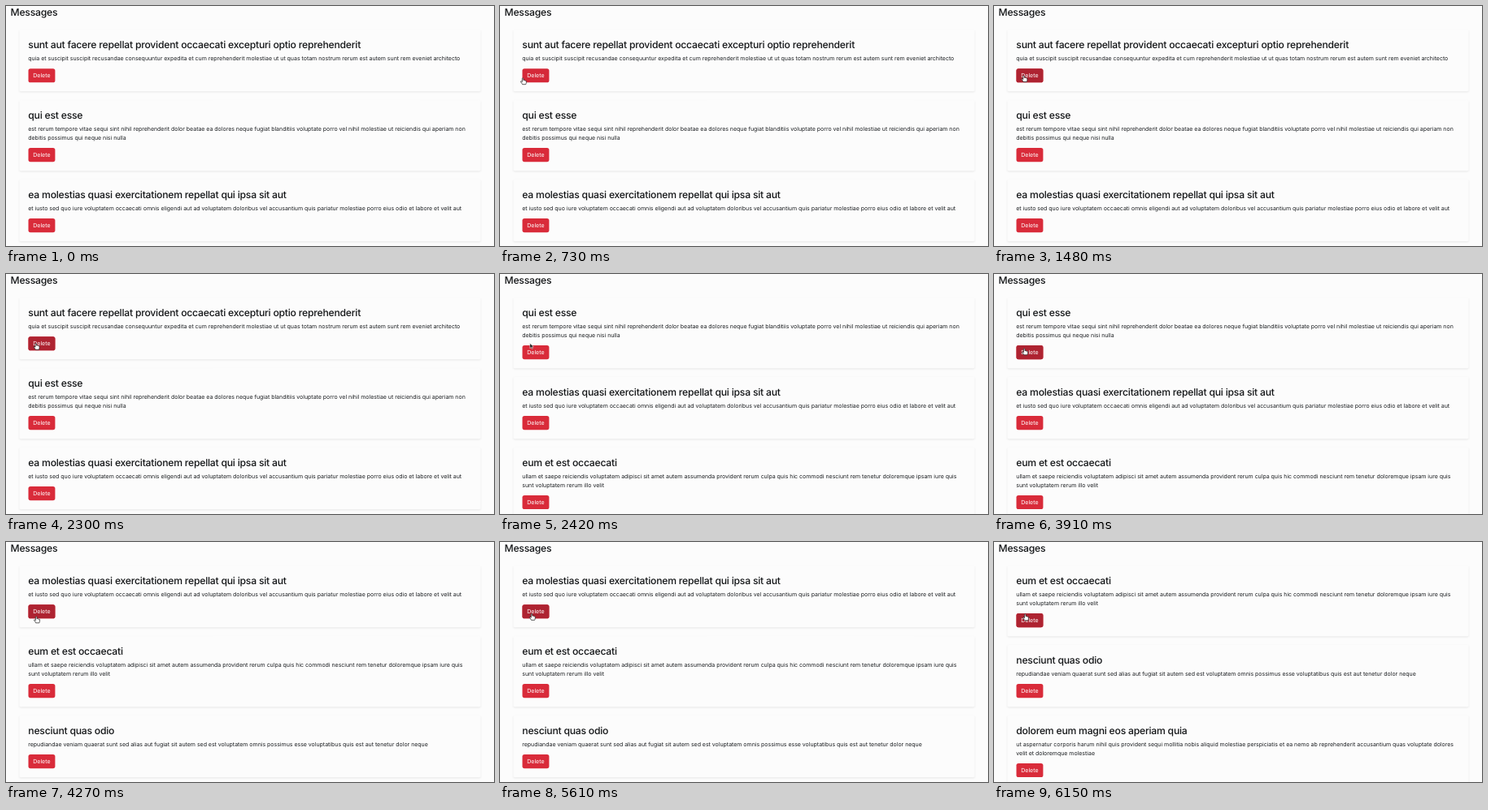
These frames come from a looping animation (600 px wide and 296 px high, 6180 ms). An HTML page:

```html
<!DOCTYPE html>
<html lang="en">
<head>
<meta charset="utf-8">
<title>Messages</title>
<style>
  html, body { margin: 0; width: 100%; height: 100%; overflow: hidden; background: #fcfcfc; }
  svg { display: block; width: 600px; height: 296px; }
  text { font: 7px Inter, "Open Sans", sans-serif; letter-spacing: -.02px; fill: #1b1e21; text-rendering: geometricPrecision; }
  .title { font-size: 12.2px; font-weight: 500; letter-spacing: -.235px; fill: #141618; }
  .label { fill: #fff; letter-spacing: 0; text-anchor: middle; }
  .card { fill: #fcfcfc; filter: drop-shadow(0 1.1px .8px rgba(0, 0, 0, .085)); }
  .button { fill: #d92b3a; }
  .hover { fill: #ae2331; }
</style>
</head>
<body>
<svg id="stage" viewBox="0 0 600 296">
  <text class="title" x="5.5" y="11.6">Messages</text>
  <g id="list"></g>
  <g id="cursor">
    <path id="hand" fill="#fff" stroke="#222" stroke-width=".85" stroke-linejoin="round"
      d="M-.9 .6Q0 -.8 .9 .6V3.2Q2 2.6 2.5 3.5Q3.4 3 3.9 4Q5 3.6 5 4.8V6.5Q4.8 8 4.2 9.2H-.6Q-1 8 -3 5.6Q-3.4 4.4 -2 4.7L-.9 5.7Z"/>
    <path id="arrow" fill="#111" stroke="#fff" stroke-width=".6"
      d="M0 0V7.3L1.7 5.7 2.8 8.2 4 7.7 2.9 5.2H5.2Z"/>
  </g>
</svg>
<script>
const LOOP = 6180, FADE = 150;
const LINE = 10.9, CARD_TOP = 29.2, CARD_HEIGHT = 76.1, GAP = 10.9;

const messages = [
  ["sunt aut facere repellat provident occaecati excepturi optio reprehenderit",
    "quia et suscipit suscipit recusandae consequuntur expedita et cum reprehenderit molestiae ut ut quas totam nostrum rerum est autem sunt rem eveniet architecto"],
  ["qui est esse",
    "est rerum tempore vitae sequi sint nihil reprehenderit dolor beatae ea dolores neque fugiat blanditiis voluptate porro vel nihil molestiae ut reiciendis qui aperiam non",
    "debitis possimus qui neque nisi nulla"],
  ["ea molestias quasi exercitationem repellat qui ipsa sit aut",
    "et iusto sed quo iure voluptatem occaecati omnis eligendi aut ad voluptatem doloribus vel accusantium quis pariatur molestiae porro eius odio et labore et velit aut"],
  ["eum et est occaecati",
    "ullam et saepe reiciendis voluptatem adipisci sit amet autem assumenda provident rerum culpa quis hic commodi nesciunt rem tenetur doloremque ipsam iure quis",
    "sunt voluptatem rerum illo velit"],
  ["nesciunt quas odio",
    "repudiandae veniam quaerat sunt sed alias aut fugiat sit autem sed est voluptatem omnis possimus esse voluptatibus quis est aut tenetur dolor neque"],
  ["dolorem eum magni eos aperiam quia",
    "ut aspernatur corporis harum nihil quis provident sequi mollitia nobis aliquid molestiae perspiciatis et ea nemo ab reprehenderit accusantium quas voluptate dolores",
    "velit et doloremque molestiae"]
];

// Each scene begins with a deletion; hover is when the pointer reaches the top button.
const scenes = [
  { start: 0, hover: 715 },
  { start: 2360, hover: 2790 },
  { start: 4030, hover: 4060 },
  { start: 5640, hover: 5645 }
];

// Pointer tip: time, x, y
const route = [
  [380, -7, 106], [730, 28, 88.8], [1000, 36.3, 85.8], [1210, 36.8, 85.4],
  [1390, 36.8, 85.4], [1700, 36.4, 85.9], [2000, 36.8, 85.4], [2700, 36.8, 85.4],
  [3030, 37.1, 91.9], [4610, 37.2, 91.9], [5000, 38, 91],
  [5180, 38, 91], [5610, 39, 88.4], [6180, 38.2, 88.9]
];

const byId = id => document.getElementById(id);
const list = byId("list"), cursor = byId("cursor"), hand = byId("hand"), arrow = byId("arrow");
const clamp = v => Math.max(0, Math.min(1, v));
const show = (node, visible) => node.setAttribute("visibility", visible ? "inherit" : "hidden");

function cardMarkup([title, ...lines], top) {
  const extra = (lines.length - 1) * LINE;
  const buttonTop = top + 48 + extra;
  const button = (name, opacity) =>
    `<rect class="${name}" x="27.5" y="${buttonTop}" width="32.9" height="17.1" rx="2.6" opacity="${opacity}"/>`;
  return `<rect class="card" x="16.4" y="${top}" width="567.2" height="${CARD_HEIGHT + extra}" rx="1.8"/>
    <text class="title" x="27.3" y="${top + 23}">${title}</text>
    ${lines.map((line, i) => `<text x="27.3" y="${top + 37.8 + i * LINE}">${line}</text>`).join("")}
    ${button("button", 1)}${button("hover", 0)}
    <text class="label" x="43.9" y="${buttonTop + 11.1}">Delete</text>`;
}

function drawList(first) {
  let top = CARD_TOP;
  list.innerHTML = messages.slice(first, first + 3).map(message => {
    const markup = cardMarkup(message, top);
    top += CARD_HEIGHT + GAP + (message.length - 2) * LINE;
    return markup;
  }).join("");
}

function pointerAt(t) {
  const next = Math.max(1, route.findIndex(point => point[0] >= t));
  const [t0, x0, y0] = route[next - 1], [t1, x1, y1] = route[next];
  const p = clamp((t - t0) / (t1 - t0));
  const eased = p * (2 - p);
  return [x0 + (x1 - x0) * eased, y0 + (y1 - y0) * eased];
}

let shown = -1;

function render(t) {
  const index = scenes.findLastIndex(scene => t >= scene.start);
  const { start, hover } = scenes[index];
  if (index !== shown) drawList(shown = index);
  list.querySelector(".hover").setAttribute("opacity", clamp((t - hover) / FADE));

  // The pointer keeps its shape briefly after a card disappears beneath it.
  const pointing = t >= hover || (index > 0 && t < start + 40);
  show(cursor, t >= route[0][0]);
  show(hand, pointing);
  show(arrow, !pointing);
  cursor.setAttribute("transform", `translate(${pointerAt(t)}) scale(.86)`);
}

const begin = performance.now();
function tick() {
  render((performance.now() - begin) % LOOP);
  requestAnimationFrame(tick);
}
tick();
</script>
</body>
</html>
```
